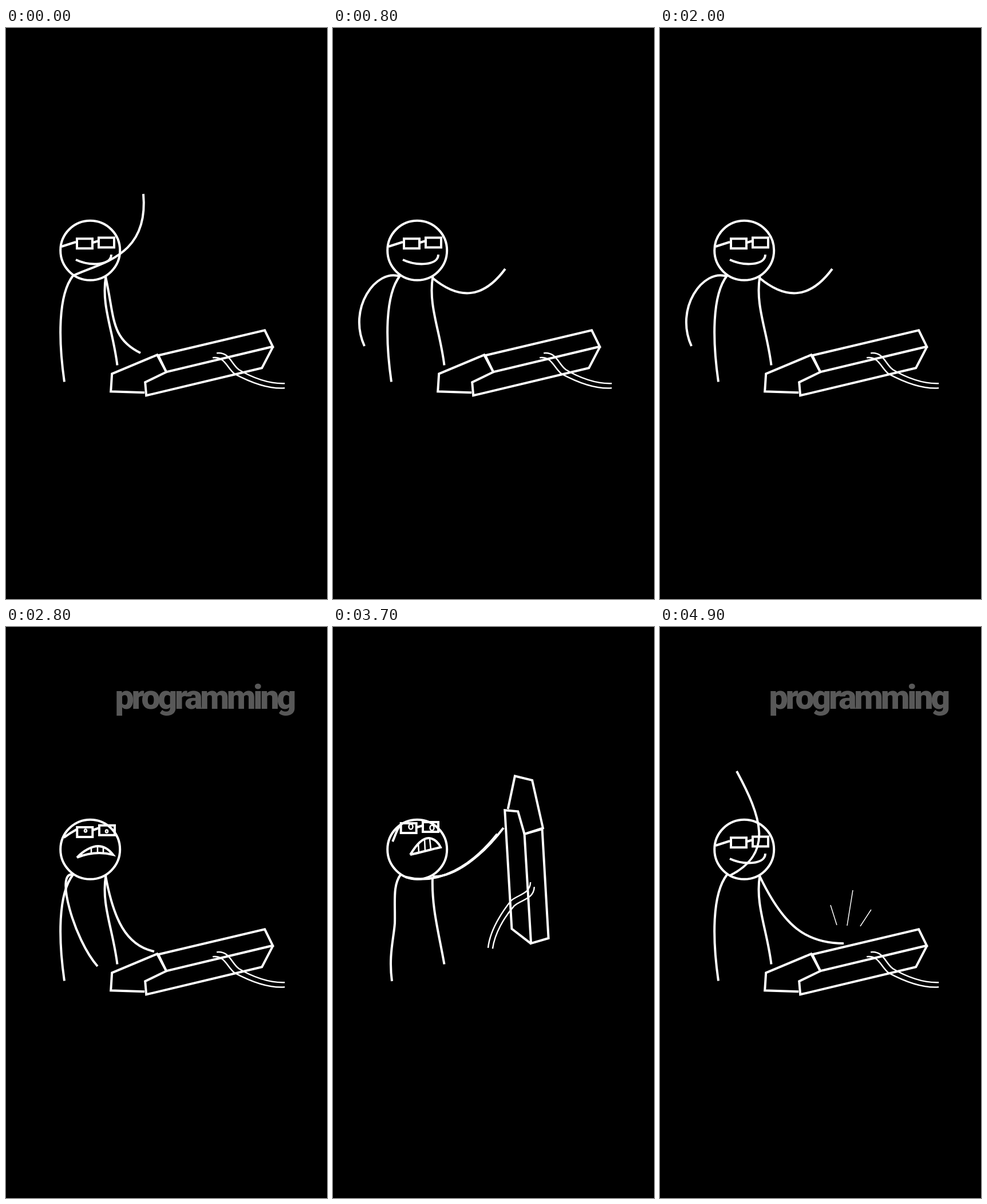
Write an HTML page that moves like this. It is 561 px wide and 998 px high and loops after 5000 ms.

```html
<!DOCTYPE html>
<html lang="en">
<head>
<meta charset="utf-8">
<title>Programming</title>
<style>
  html, body { margin: 0; width: 100%; height: 100%; overflow: hidden; background: #000; }
  svg { display: block; width: 100vw; height: 100vh; }
  path, circle { fill: none; stroke: #fff; stroke-width: 4; }
  .cable { stroke-width: 2.5; }
  .thin { stroke-width: 2.6; }
  .ray { stroke-width: 1.5; }
  text { font: 900 59px Roboto, sans-serif; letter-spacing: -4.3px; fill: #585858; }
</style>
</head>
<body>
<svg viewBox="0 0 561 998">
  <text id="word" x="190.5" y="143">programming</text>
  <path id="bodyL"/>
  <path id="bodyR"/>
  <circle cx="147.2" cy="388.8" r="52"/>
  <path id="face"/>
  <path id="detail" class="thin"/>
  <g id="board">
    <path d="M242 637L183 635L185 604L264 571L280 601"/>
    <path d="M266 572L452 528L466 556.5L280 601Z"/>
    <path d="M280 601L243 619L245 642L447 594L466.5 556.5"/>
    <path class="cable" d="M368 568C390 565 394 588 407 597C430 611 460 622 487 621"/>
    <path class="cable" d="M361 576C382 573 386 594 399 604C425 618 458 631 487 629"/>
  </g>
  <path id="armA"/>
  <path id="armB"/>
  <path id="rays" class="ray" d="M298 486L309 521M337 460L327 522M369 494L350 523"/>
</svg>
<script>
const STEP = 100, COUNT = 50, CYCLE = 12;
const $ = id => document.getElementById(id);
const parts = ['word', 'bodyL', 'bodyR', 'face', 'detail', 'board', 'armA', 'armB', 'rays'];
const el = Object.fromEntries(parts.map(id => [id, $(id)]));

// Arm poses
const A = {
  fore: 'M117 433C165 410 250 400 240 290',
  drop: 'M117 433C160 450 230 430 290 440',
  hit: 'M117 433C140 510 200 545 262 570',
  wide: 'M117 434C70 415 5 480 45 550',
  back: 'M117 434C75 420 25 490 55 556',
  lift: 'M117 434C80 420 5 420 18 350',
  high: 'M123 434C200 395 176 330 134 252',
  rest: 'M117 433C85 425 119 547 160 593',
  reach: 'M120 434C120 520 170 580 235 590',
  hold: 'M127 437C170 488 220 503 278 502',
  heave: 'M127 437C190 440 250 390 290 315',
  thrown: 'M127 435C146 385 150 360 97 276'
};
const B = {
  low: 'M174 435C190 505 182 542 235 568',
  rise: 'M174 435C200 480 225 505 262 505',
  top: 'M174 436C215 470 265 440 290 380',
  mid: 'M174 437C220 475 262 474 301 421',
  hit: 'M174 435C216 523 255 553 321 553',
  rest: 'M174 435C188 511 210 557 259 567',
  hold: 'M174 437C205 474 235 489 277 489',
  heave: 'M174 436C215 425 270 370 305 305',
  thrown: 'M174 435C190 388 200 345 156 275'
};

const typeA = [[0, A.fore], [2, A.drop], [4, A.hit], [6, A.wide], [8, A.back],
               [10, A.lift], [11, A.high], [12, A.fore]];
const typeB = [[0, B.low], [3, B.rise], [6, B.top], [8, B.mid], [11, B.hit], [12, B.low]];
const rageA = [[24, A.fore], [25, A.hit], [26, A.wide], [28, A.rest], [30, A.reach],
               [34, A.hold], [38, A.heave], [41, A.thrown]];
const rageB = [[24, B.low], [28, B.rest], [30, B.rest], [34, B.hold], [38, B.heave], [41, B.thrown]];

const bodyL = [[28, 'M117 433C103.5 450.5 97.2 479.8 95.6 513C94 546.5 97 584 102 618.5'],
               [33, 'M118 433C104 452 109 480 108 518C106 545 97 575 103 619']];
const bodyR = [[28, 'M174.5 434C166 485 187 528 194.5 589.5'],
               [33, 'M174 437C172 490 185 535 194.5 589.5']];

const box = (x, y) => `M${x} ${y}h27v17h-27Z`;
const ring = (x, y, rx, ry) =>
  `M${x - rx} ${y}a${rx} ${ry} 0 1 0 ${2 * rx} 0a${rx} ${ry} 0 1 0 ${-2 * rx} 0`;

const happy = box(124, 368.3) + box(162, 366.5) +
  'M152 375L162 372M97 382L122 374M122 405C145 416 184 416 184 396';
const face = [
  [28, box(124.3, 350) + box(163, 346.7) + 'M152 355L163 351M101 368C108 363 116 358 123 354' +
       'M124 403C135 391 150 383 161 383C172 383 180 389 187 398C166 393 146 394 124 403'],
  [33, box(118.7, 343) + box(157, 341) + 'M147 350L157 347M104 375C107 370 112 352 117 347' +
       'M135 398C147 378 158 368 168 369C178 370 185 378 188 385C170 389 153 394 135 398']];
const detail = [
  [28, ring(139, 356, 2, 2.5) + ring(176, 357, 2, 2.5) + 'M149 386L149 396M160 383L160 394M170 385L170 395'],
  [33, ring(136, 349, 3.5, 4.5) + ring(173, 351, 3.5, 4.5) + 'M149 378L150 394M160 371L161 391M169 370L171 389']];

// Keyboard: centre and angle
const flight = [[30, '325.2 585.3 0'], [34, '365.8 521.2 49.9'], [36, '345 430 82'], [38, '340 388 118'],
                [40, '385 368 152'], [41, '424.5 341 168.3'], [42, '418 262 178'], [45, '408 20 205']];

const NUM = /-?\d+(\.\d+)?/g;
function mix(a, b, u) {
  const to = b.match(NUM);
  let i = 0;
  return a.replace(NUM, v => +(+v + (to[i++] - v) * u).toFixed(2));
}
function at(track, n) {
  if (n <= track[0][0]) return track[0][1];
  for (let i = 1; i < track.length; i++) {
    const [t0, a] = track[i - 1], [t1, b] = track[i];
    if (n <= t1) return mix(a, b, (n - t0) / (t1 - t0));
  }
  return track[track.length - 1][1];
}
const show = (node, on) => node.setAttribute('visibility', on ? 'visible' : 'hidden');
const draw = (id, d) => el[id].setAttribute('d', d);

function render(n) {
  const last = n === COUNT - 1;
  const typing = n < 24 || last;
  const beat = last ? CYCLE - 1 : n % CYCLE;
  const calm = n < 27 || last;
  const pose = last ? 0 : n;

  draw('armA', typing ? at(typeA, beat) : at(rageA, n));
  draw('armB', typing ? at(typeB, beat) : at(rageB, n));
  draw('bodyL', at(bodyL, pose));
  draw('bodyR', at(bodyR, pose));
  draw('face', calm ? happy : at(face, n));
  draw('detail', calm ? '' : at(detail, n));

  const [x, y, r] = at(flight, pose).split(' ');
  el.board.setAttribute('transform', `translate(${x} ${y}) rotate(${r}) translate(-325 -585)`);

  show(el.rays, typing && beat === CYCLE - 1);
  show(el.word, last || (n < 41 && n % 6 > 3));
}

let shown = -1;
function tick() {
  const n = Math.floor(performance.now() / STEP) % COUNT;
  if (n !== shown) render(shown = n);
  requestAnimationFrame(tick);
}
tick();
</script>
</body>
</html>
```
